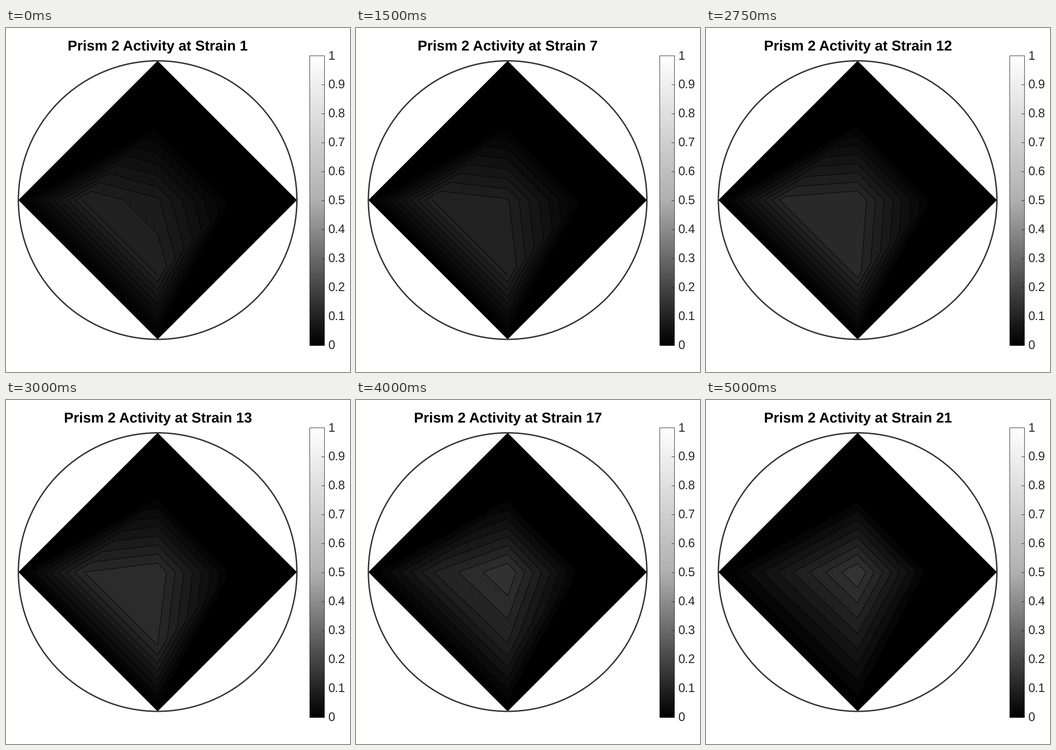
A matplotlib script for the animation above (5250 ms loop, 748x748 px).

```python
import numpy as np
import matplotlib.pyplot as plt
from matplotlib.animation import FuncAnimation
from matplotlib.colors import LinearSegmentedColormap
from matplotlib.patches import Circle, Polygon, Rectangle

SIZE, DPI = 748, 100
PX = 72 / DPI
FRAMES, INTERVAL = 21, 250
CX, CY, R_OUT = 329.7, 374.2, 302.8
R_MID = 0.54 * R_OUT
DARK = "#262626"
GRAYS = LinearSegmentedColormap.from_list("grays", ["black", "0.69", "white"],
                                          N=1024)

plt.rcParams["font.family"] = "Liberation Sans"
plt.rcParams["text.hinting"] = "none"

# Polar grid: three radii, four directions with the first one repeated.
radius = np.array([0, R_MID, R_OUT])[:, None]
theta = np.arange(5) * np.pi / 2
GX = CX + radius * np.cos(theta)
GY = CY - radius * np.sin(theta)

fig = plt.figure(figsize=(SIZE / DPI, SIZE / DPI), dpi=DPI, facecolor="white")
ax = fig.add_axes([0, 0, 1, 1])


def logistic(x):
    return 1 / (1 + np.exp(-x))


def activity(step):
    """Activity at the centre and at the right, top, left and bottom."""
    centre = 0.080 + 0.085 * logistic(0.36 * (step - 10))
    top = 0.0055 + 0.0055 * np.exp(-((step - 12) / 5) ** 2)
    right = top - 0.005 * logistic(1.5 * (step - 10.5))
    left = np.interp(step, [0, 2, 6, 9, 12, 16, 20],
                     [0.103, 0.0935, 0.1065, 0.120, 0.1215, 0.103, 0.078])
    bottom = left * (1 - 0.0055 * max(0, step - 12))
    return centre, [right, top, left, bottom]


def draw_colorbar(x0=660.4, x1=692.4, top=59.6, bottom=689.6):
    ramp = np.linspace(1, 0, 256)[:, None]
    ax.imshow(ramp, cmap=GRAYS, vmin=0, vmax=1, aspect="auto",
              extent=(x0, x1, bottom, top), interpolation="nearest")
    ax.add_patch(Rectangle((x0, top), x1 - x0, bottom - top, fill=False,
                           ec=DARK, lw=PX, zorder=3))
    for i in range(11):
        y = bottom + (top - bottom) * i / 10
        ax.plot([x1 - 6, x1], [y, y], color=DARK, lw=PX, zorder=3)
        ax.text(701.2, y + 9.3, f"{i / 10:g}", size=26.6 * PX, color=DARK,
                va="baseline")


draw_colorbar()
ax.add_patch(Polygon(np.c_[GX[2, :4], GY[2, :4]], fc="black", lw=0, zorder=1))
ax.add_patch(Circle((CX, CY), R_OUT, fill=False, ec="#333333", lw=3 * PX,
                    zorder=4))
title = ax.text(330, 49, "", size=31.1 * PX, weight="bold", color="black",
                ha="center", va="baseline")
ridge, = ax.plot(GX[1, 2:4], GY[1, 2:4], color="black", lw=PX, zorder=3)
ax.set_xlim(0, SIZE)
ax.set_ylim(SIZE, 0)
ax.axis("off")

contours = []


def update(step):
    while contours:
        contours.pop().remove()

    centre, ring = activity(step)
    z = np.zeros((3, 5))
    z[0] = centre
    z[1] = ring + ring[:1]
    peak = z.max()

    levels = peak * np.arange(1, 9) / 9
    contours.append(ax.contourf(GX, GY, z, levels=[*levels, peak * 1.01],
                                colors=GRAYS(levels), zorder=2))
    contours.append(ax.contour(GX, GY, z, levels=levels, colors="black",
                               linewidths=PX, zorder=3))
    # The top level collapses to a line while left and bottom share the peak.
    ridge.set_visible(bool(ring[2] == ring[3] == peak))
    title.set_text(f"Prism 2 Activity at Strain {step + 1}")
    return [title, ridge]


anim = FuncAnimation(fig, update, frames=FRAMES, interval=INTERVAL,
                     repeat=True, repeat_delay=0, blit=False)
plt.show()
```
